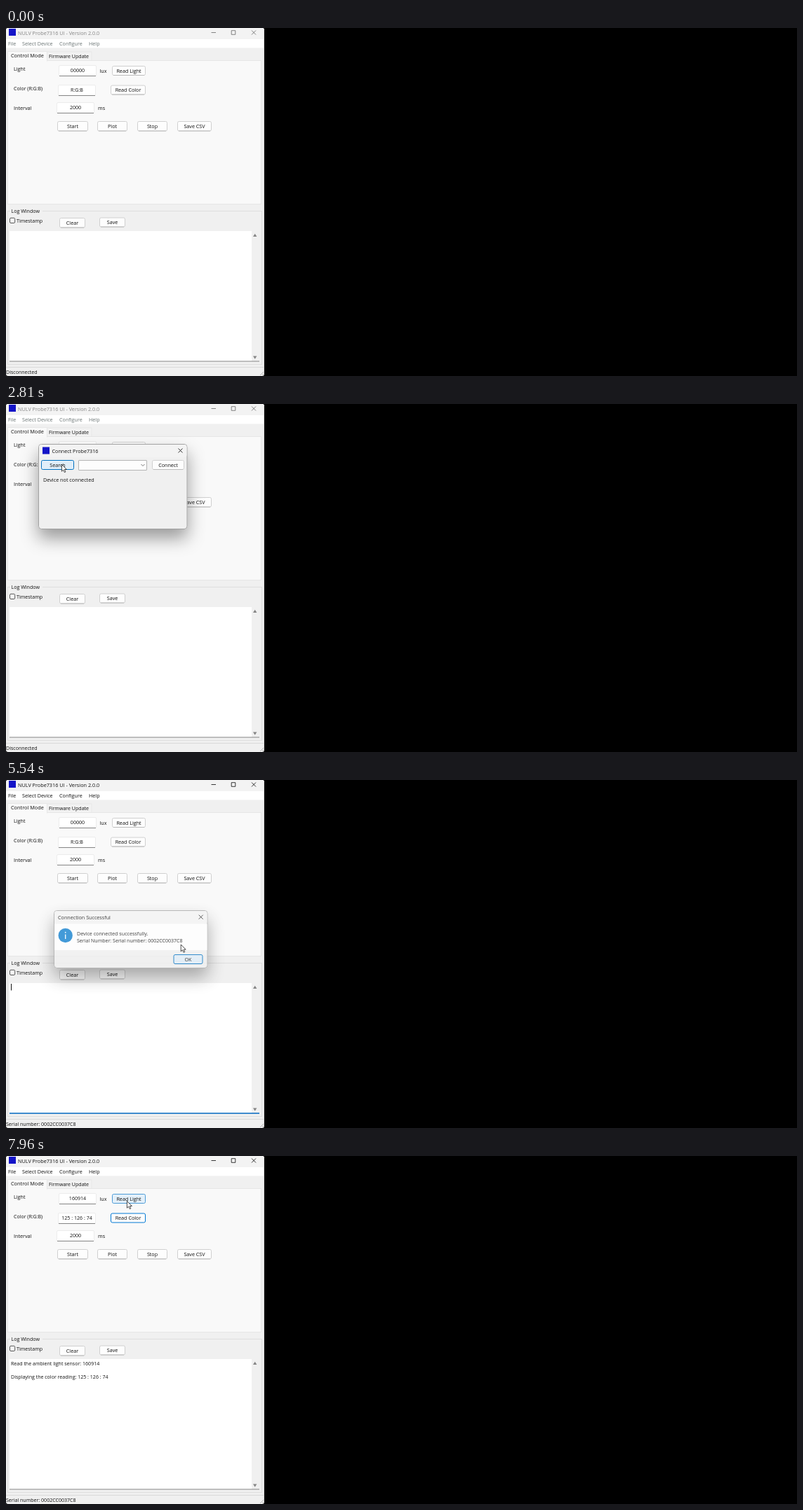
Recreate the animation shown at these times as an HTML page. Size 1127 px wide and 497 px high, loop 8 s.

```html
<!DOCTYPE html>
<html lang="en">
<head>
<meta charset="utf-8">
<title>Sensor panel</title>
<style>
html, body { margin: 0; width: 100%; height: 100%; overflow: hidden; background: #000; }
svg { display: block; }
text { font: 7.2px "Open Sans", "Noto Sans", sans-serif; fill: #111; white-space: pre; }
</style>
</head>
<body>
<svg id="stage" width="1127" height="497" viewBox="0 0 1127 497">
  <defs>
    <filter id="shadow" x="-30%" y="-30%" width="160%" height="190%">
      <feDropShadow dx="0" dy="13" stdDeviation="12" flood-color="#000" flood-opacity=".38"/>
    </filter>
    <filter id="soft" x="-20%" y="-30%" width="140%" height="190%">
      <feDropShadow dx="0" dy="3" stdDeviation="3" flood-color="#000" flood-opacity=".2"/>
    </filter>
  </defs>
</svg>
<script>
const LOOP = 8000;
const BLUE = '#0067c0';
const stage = document.getElementById('stage');

function make(parent, tag, attrs, content) {
  const el = document.createElementNS('http://www.w3.org/2000/svg', tag);
  set(el, attrs);
  if (content !== undefined) el.textContent = content;
  parent.appendChild(el);
  return el;
}
function set(el, attrs) {
  for (const k in attrs) el.setAttribute(k, attrs[k]);
}
const group = (parent, attrs = {}) => make(parent, 'g', attrs);
const path = (parent, d, stroke, width = 1, fill = 'none') =>
  make(parent, 'path', { d, stroke, 'stroke-width': width, fill });
function rect(parent, x, y, x2, y2, fill, stroke = 'none', rx = 0) {
  return make(parent, 'rect', { x, y, width: x2 - x, height: y2 - y, fill, stroke, rx });
}
// y is the middle of the capitals
function label(parent, x, y, content, size = 7.2, anchor = 'start') {
  return make(parent, 'text', { x, y: y + 2.6, 'text-anchor': anchor, style: `font-size:${size}px` }, content);
}

const looks = {
  normal: { fill: '#fdfdfd', stroke: '#d0d0d0' },
  focus: { fill: '#fdfdfd', stroke: '#0078d4' },
  hover: { fill: '#e3f0fa', stroke: '#4c9bd6' },
  hot: { fill: '#e0eef9', stroke: '#0071c1' },
  press: { fill: '#cce4f7', stroke: '#0a5799' }
};
function button(parent, x, y, x2, y2, content, look = 'normal') {
  const face = rect(parent, x + .5, y + .5, x2 - .5, y2 - .5, '', '', 2);
  const base = path(parent, `M${x + 2} ${y2 - .5}H${x2 - 2}`, '#bcbcbc');
  label(parent, (x + x2) / 2, (y + y2) / 2, content, 7.2, 'middle');
  const paint = name => {
    set(face, looks[name]);
    set(base, { opacity: name === 'normal' ? 1 : 0 });
  };
  paint(look);
  return paint;
}
function field(x, y, x2, y2, content) {
  rect(main, x + .5, y + .5, x2 - .5, y2 - .5, '#fff', '#ececec', 1.5);
  path(main, `M${x + 1} ${y2 - .5}H${x2 - 1}`, '#858585');
  return label(main, (x + x2) / 2, (y + y2) / 2 - 1, content, 7.1, 'middle');
}
const closeMark = (parent, x, y) =>
  path(parent, `M${x - 3} ${y - 3}l6 6m0 -6l-6 6`, '#222', .9);
const appIcon = (parent, x, y) => rect(parent, x, y, x + 10, y + 10, '#1414c8');

// Main window
const main = group(stage);
rect(main, 0, 0, 368, 497, '#f0f0f0', 'none', 3);
rect(main, 0, 0, 368, 17, '#f3f3f3', 'none', 3);
rect(main, 0, 16, 367.5, 28.5, '#fff');
path(main, 'M367.5 3V495', '#d8d8d8');
appIcon(main, 4, 1);

const frameText = [label(main, 17, 7, 'NULV Probe7316 UI - Version 2.0.0', 7.27)];
[[3, 'File'], [23, 'Select Device'], [76, 'Configure'], [118, 'Help']]
  .forEach(([x, s]) => frameText.push(label(main, x, 22.7, s)));
const controls = group(main);
path(controls, 'M292.5 6.5h6.5', '#222', .9);
path(controls, 'M321.2 3.7h5.6v5.6h-5.6z', '#222', .9);
closeMark(controls, 353, 6.5);

rect(main, 58, 34, 122, 47, '#f2f2f2', '#e8e8e8');
rect(main, 2.5, 46.5, 363.5, 251.5, '#f9f9f9', '#e6e6e6');
path(main, 'M2.5 47.5V33.5H58.5V47.5', '#e6e6e6', 1, '#f9f9f9');
label(main, 7, 39.3, 'Control Mode', 7.33);
label(main, 61, 40.5, 'Firmware Update', 7.07);

label(main, 11, 58.7, 'Light');
label(main, 11, 86, 'Color (R:G:B)', 7);
label(main, 11, 114.5, 'Interval');
label(main, 133.5, 61, 'lux');
label(main, 131, 114.5, 'ms');
const lightValue = field(75, 53, 129, 69, '00000');
const colorValue = field(74, 81, 128, 97, 'R:G:B');
field(72, 106, 126, 122, '2000');
const readLight = button(main, 151, 54, 199, 68, 'Read Light');
const readColor = button(main, 149, 81.5, 199, 95.5, 'Read Color');
[[73, 117, 'Start'], [130, 173, 'Plot'], [187, 230, 'Stop'], [244, 293, 'Save CSV']]
  .forEach(([x, x2, s]) => button(main, x, 133, x2, 147.5, s));

rect(main, 2.5, 261.5, 364.5, 480.5, 'none', '#dedede');
rect(main, 6, 258, 52, 266, '#f0f0f0');
label(main, 7.5, 261.2, 'Log Window', 7.1);
rect(main, 5.5, 271.3, 12.7, 278.5, '#f8f8f8', '#555', 1.5);
label(main, 15, 275, 'Timestamp', 7.1);
button(main, 76, 271, 113, 285.5, 'Clear');
button(main, 133, 270.5, 170, 284.5, 'Save');

rect(main, 5, 290, 361, 476, '#fff');
rect(main, 350, 290, 361, 476, '#f0f0f0');
path(main, 'M352 298L354.7 293.8L357.4 298Z', 'none', 0, '#858585');
path(main, 'M352 468.5L354.7 472.7L357.4 468.5Z', 'none', 0, '#858585');
const logLine = path(main, 'M5 476H361', '#858585');
const caret = path(main, 'M7.5 291V300.5', '#111');
const logLight = label(main, 7, 296, 'Read the ambient light sensor: 160914', 7.05);
const logColor = label(main, 7, 315, 'Displaying the color reading: 125 : 126 : 74', 7.05);

path(main, 'M0 484.5H368', '#d9d9d9');
const status = label(main, 0, 491.3, '', 7.06);
path(main, 'M362 496L367 491M365 496L367 494', '#aaa', .8);

// Drop-down menu
const menu = group(stage);
set(rect(menu, 20, 29.5, 143.5, 59.5, '#f9f9f9', '#e4e4e4', 3), { filter: 'url(#soft)' });
const menuHover = rect(menu, 22, 31, 141, 44, '#f0f0f0', 'none', 2);
label(menu, 43, 37.3, 'Connect - Ctrl+N');
label(menu, 43, 51.3, 'Disconnect - Ctrl+I');

// Connect dialog
const dialog = group(stage);
set(rect(dialog, 46.5, 57.5, 258, 178.5, '#f0f0f0', '#a2a2a2', 4), { filter: 'url(#shadow)' });
rect(dialog, 47, 58, 257.5, 76, '#f3f3f3', 'none', 3.5);
appIcon(dialog, 52, 61.5);
label(dialog, 65.5, 67, 'Connect Probe7316');
closeMark(dialog, 248.5, 66.5);
const search = button(dialog, 50, 80, 97, 94, 'Search');
rect(dialog, 103.5, 80.5, 200.5, 94.5, '#fdfdfd', '#b4b4b4', .5);
path(dialog, 'M192.5 86l2.5 2.5l2.5 -2.5', '#555', .8);
const connect = button(dialog, 208, 80, 254, 94, 'Connect');
label(dialog, 53, 108.7, 'Device not connected', 7.25);

// Message box
const message = group(stage);
set(rect(message, 68.5, 186.5, 287, 268.5, '#f0f0f0', '#a8a8a8', 4), { filter: 'url(#shadow)' });
rect(message, 69, 187, 286.5, 206, '#f3f3f3', 'none', 3.5);
rect(message, 69, 205.5, 286.5, 243, '#fff');
label(message, 74, 196, 'Connection Successful', 7.2);
closeMark(message, 277.7, 195.7);
make(message, 'circle', { cx: 84.7, cy: 222, r: 10.2, fill: '#1583d0' });
path(message, 'M84.7 220.5V227', '#fff', 1.3);
make(message, 'circle', { cx: 84.7, cy: 217.7, r: .9, fill: '#fff' });
label(message, 101, 219.8, 'Device connected successfully.', 7.15);
label(message, 101, 229.3, 'Serial Number: Serial number: 0002CC0037C8', 7.05);
const ok = button(message, 238.5, 249, 280.5, 263, 'OK', 'focus');

const cursor = path(stage, 'M.4 .4V10.2L2.7 8.1L4.3 11.6L5.9 10.9L4.4 7.5H7.4Z', '#111', .75, '#fff');
cursor.setAttribute('stroke-linejoin', 'round');

// Pointer route: time, x, y
const route = [
  [110, 924, 457], [420, 520, 215], [680, 150, 35], [820, 14, 8], [910, 49, 11],
  [980, 49, 11], [1040, 49, 19], [1510, 49, 19], [1650, 57, 31], [1720, 57, 34],
  [2340, 57, 34], [2740, 79, 86], [3010, 79, 86], [3140, 247, 91], [3340, 247, 91],
  [3670, 240, 91], [4360, 240, 91], [4610, 251, 128], [4740, 255, 176], [4810, 255, 176],
  [4980, 320, 222], [5200, 259, 257], [5430, 259, 257], [5540, 249, 235], [5980, 167, 61],
  [6310, 167, 61], [6610, 171, 87], [7620, 171, 87], [7760, 171, 79],
  [7830, 171, 79], [7960, 172, 64]
];
const clamp = v => Math.max(0, Math.min(1, v));
const ramp = (t, a, b) => clamp((t - a) / (b - a));
const within = (t, a, b) => t >= a && t < b;
const show = (el, opacity) => set(el, { opacity, display: opacity > 0 ? 'inline' : 'none' });
// Latest entry of [start, value] pairs that has begun
const pick = (t, ...steps) => steps.reduce((v, [start, value]) => t >= start ? value : v, steps[0][1]);

function pointer(t) {
  const next = route.findIndex(p => p[0] > t);
  if (next < 0) return route[route.length - 1].slice(1);
  if (next === 0) return route[0].slice(1);
  const a = route[next - 1], b = route[next], k = ramp(t, a[0], b[0]);
  return [a[1] + (b[1] - a[1]) * k, a[2] + (b[2] - a[2]) * k];
}
function zoom(el, cx, cy, s) {
  set(el, { transform: `translate(${cx} ${cy}) scale(${s}) translate(${-cx} ${-cy})` });
}
const fade = (t, inA, inB, outA, outB) => ramp(t, inA, inB) * (1 - ramp(t, outA, outB));

function draw(t) {
  const active = within(t, 1180, 1900) || within(t, 4260, 4440) || t >= 5420;
  const typing = within(t, 1180, 1900) || within(t, 5420, 6080);
  frameText.forEach((el, i) => el.style.fill = active ? '#111' : i ? '#6a7474' : '#858585');
  set(controls, { opacity: active ? 1 : .6 });
  show(caret, typing ? 1 : 0);
  set(logLine, { stroke: typing ? BLUE : '#858585', 'stroke-width': typing ? 1.6 : 1 });

  status.textContent = pick(t, [0, 'Disconnected'], [1180, ''], [1780, 'Disconnected'],
    [4240, 'Serial number: 0002CC0037C8']);
  lightValue.textContent = t < 6980 ? '00000' : '160914';
  colorValue.textContent = t < 7500 ? 'R:G:B' : '125 : 126 : 74';
  show(logLight, t >= 6980 ? 1 : 0);
  show(logColor, t >= 7500 ? 1 : 0);

  readLight(pick(t, [0, 'normal'], [5960, 'hover'], [6080, 'press'], [7030, 'focus'],
    [7180, 'normal'], [7900, 'hover']));
  readColor(pick(t, [0, 'normal'], [7030, 'hover'], [7180, 'press'], [7500, 'hot'], [7680, 'focus']));
  search(pick(t, [0, 'focus'], [2640, 'hot'], [3940, 'focus'], [4060, 'normal']));
  connect(pick(t, [0, 'normal'], [3940, 'hover'], [4060, 'press']));
  ok(pick(t, [0, 'focus'], [5150, 'hot']));

  show(menu, fade(t, 1160, 1310, 1760, 1860));
  set(menuHover, { opacity: t >= 1570 ? 1 : 0 });
  show(dialog, fade(t, 1900, 2080, 4240, 4360));
  zoom(dialog, 152, 118, .92 + .08 * ramp(t, 1900, 2270));
  show(message, fade(t, 4440, 4580, 5500, 5700));
  zoom(message, 177, 227.5, .92 + .08 * ramp(t, 4440, 4780));

  const [x, y] = pointer(t);
  show(cursor, t < 110 ? 0 : 1);
  set(cursor, { transform: `translate(${x} ${y})` });
}

const started = performance.now();
function tick() {
  draw((performance.now() - started) % LOOP);
  requestAnimationFrame(tick);
}
draw(0);
requestAnimationFrame(tick);
</script>
</body>
</html>
```
